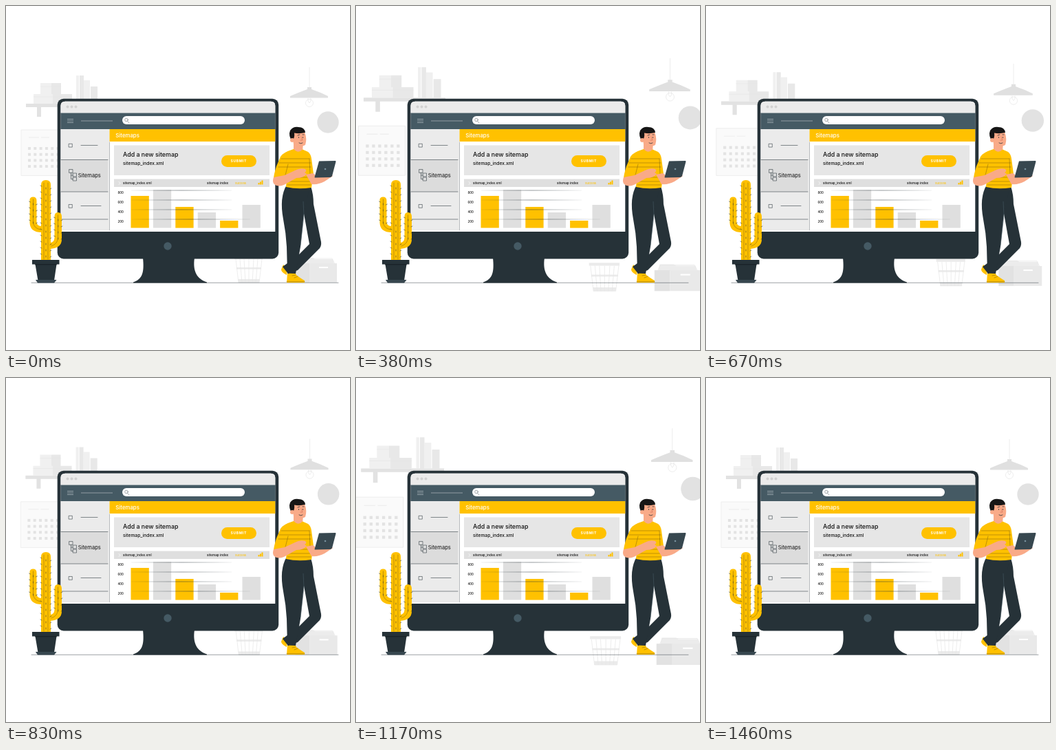
These frames come from a looping animation (500x500 px, 1500 ms). An HTML page:

```html
<!DOCTYPE html>
<html lang="en">
<head>
<meta charset="utf-8">
<title>Sitemaps</title>
<style>
  html, body { margin: 0; width: 100%; height: 100%; overflow: hidden; background: #fff; }
  svg { display: block; width: 100vw; height: 100vh; }
  text { font-family: Inter, sans-serif; font-weight: 500; fill: #111; }
  .dark { fill: #263238; }
  .yellow { fill: #ffc100; }
  .skin { fill: #f9aa88; }
  .line { fill: none; stroke: #263238; stroke-width: .55; stroke-linecap: round; }
  .soft { fill: none; stroke: #e6e6e6; stroke-width: .7; }
  .fold { fill: none; stroke: #5b4a10; stroke-width: .4; stroke-linecap: round; }
</style>
</head>
<body>
<svg viewBox="0 0 500 500">
  <g id="room">
    <!-- shelf -->
    <path fill="#e2e2e2" d="M29 142H139V147H29ZM45 147H51V161H45Z"/>
    <path fill="#f0f0f0" d="M50 112H66V128H50ZM40 128H68V142H40ZM102 101H106V142H102ZM113 108H122V142H113Z"/>
    <path fill="#e8e8e8" d="M66 112H80V128H66ZM68 128H96V142H68ZM107 101H113V142H107ZM123 117H133V142H123Z"/>
    <path class="soft" d="M50 117H80M40 132H96"/>
    <!-- calendar -->
    <path fill="#fafafa" stroke="#e8e8e8" stroke-width=".7" d="M22 180H85V246.500H22Z"/>
    <path class="soft" d="M33 191H48M51 191H63"/>
    <g id="days" fill="#e3e3e3"></g>
    <!-- lamp -->
    <path class="soft" d="M441 89V120"/>
    <path fill="#e0e0e0" d="M438 118H444V121Q456 125 468 131V133.500H413V131Q427 125 438 121Z"/>
    <circle class="soft" cx="441" cy="141" r="5.5"/>
    <path class="soft" d="M439 134V138L441 141L443 138V134"/>
    <circle cx="468" cy="169" r="15.7" fill="#e2e2e2"/>
    <!-- basket -->
    <path fill="#ebebeb" d="M332 364H373V368H332ZM335 380H371V382.500H335ZM337.500 397H368.500L368 402H338Z"/>
    <path class="soft" d="M334 368L338 402H368L372 368M340 368L343 402M346 368L348 402M353 368V402M360 368L358 402M366 368L363 402"/>
    <!-- boxes -->
    <path fill="#ececec" d="M425 375L427 366H446L449 368H475L477 375Z"/>
    <path fill="#e2e2e2" d="M420 374H441V402H420Z"/>
    <path fill="#e9e9e9" d="M441 374H481V402H441Z"/>
    <path stroke="#fff" stroke-width="2" d="M455 380H468"/>
    <path class="soft" d="M424 375L428 367H474L478 375"/>
  </g>

  <path class="line" d="M37 402.300H483" style="stroke-width:.45"/>

  <!-- monitor -->
  <path class="dark" d="M199 366C201 386 199 397 185 401.500V402.500H292V401.500C278 397 271 386 274 366Z"/>
  <rect class="dark" x="74.700" y="134.700" width="321.500" height="232.800" rx="9"/>
  <path fill="#fff" d="M79.500 145Q79.500 138.700 86 138.700H385Q391.300 138.700 391.300 145V328H79.500Z"/>
  <path fill="#ebebeb" d="M79.500 145Q79.500 138.700 86 138.700H385Q391.300 138.700 391.300 145V155.500H79.500Z"/>
  <g fill="#d2d2d2">
    <circle cx="89.500" cy="146.500" r="2"/><circle cx="95.500" cy="146.500" r="2"/><circle cx="101.500" cy="146.500" r="2"/>
  </g>
  <path fill="#455a64" d="M79.500 155.500H391.300V179H79.500Z"/>
  <path stroke="#c3ccd0" stroke-width=".6" d="M89 164.500H98M89 167H98M89 169.500H98M109 167H155"/>
  <rect x="169" y="160" width="178" height="12" rx="6" fill="#fff"/>
  <g class="line" style="stroke-width:.4"><circle cx="175" cy="165.500" r="2.300"/><path d="M176.800 167.500L179 170"/></g>

  <path fill="#ebebeb" d="M79.500 179H150.500V326H79.500Z"/>
  <path fill="#dcdcdc" d="M79.500 223.500H148V270H79.500Z"/>
  <path class="line" d="M80 223.500H148M80 270H148M80 310H148M109 202.500H133M109 290.500H138"/>
  <path class="line" d="M150.500 198V326" style="stroke-width:.3"/>
  <path class="line" d="M91.500 200.300h4.800v4.800h-4.800zM91.500 288.500h4.800v4.800h-4.800z"/>
  <path class="line" d="M92 237.500h5v5h-5zM97.500 243h5v5h-5zM97.500 249h5v5h-5zM94.500 242.500V251.500H97.500M94.500 246H97.500"/>
  <text x="104.700" y="249.300" font-size="7.600" style="font-weight:400">Sitemaps</text>

  <path class="yellow" d="M150.500 179H391.300V197H150.500Z"/>
  <text x="159.300" y="191" font-size="7.800" style="fill:#fff">Sitemaps</text>
  <path fill="#e6e6e6" d="M157 202.500H383V246H157Z"/>
  <text x="170" y="219.300" font-size="8.850">Add a new sitemap</text>
  <text x="170" y="231.300" font-size="6.700">sitemap_index.xml</text>
  <rect class="yellow" x="313" y="217" width="51" height="17" rx="8.500"/>
  <text x="326.500" y="227.400" font-size="5.200" letter-spacing=".5" style="fill:#fff;font-weight:700">SUBMIT</text>
  <path fill="#dfdfdf" d="M157 251.500H383V263H157Z"/>
  <path d="M164 255.500L166 257.500L164 259.500" fill="none" stroke="#fff" stroke-width=".8"/>
  <text x="170" y="259" font-size="4.700">sitemap_index.xml</text>
  <text x="292" y="259" font-size="4.700">sitemap index</text>
  <text x="333" y="259" font-size="3.900" style="fill:#ffc100">Success</text>
  <path class="yellow" d="M366.500 257h2v2.500h-2zM369 255.500h2v4h-2zM371.500 253.500h2v6h-2z"/>
  <g id="chart"></g>
  <circle cx="235" cy="349" r="5.700" fill="#455a64"/>

  <!-- cactus -->
  <g class="yellow">
    <path d="M51 370V260Q51 253 58 253Q65 253 65 260V370Z"/>
    <path d="M52 329Q35 329 34.500 315V283Q34 277.500 39.500 277.500Q44.500 277.500 44.500 283V314Q45 320 52 320Z"/>
    <path d="M64 353Q81 352 81 339V306Q81 300 75.500 300Q70.500 300 70.500 306V337Q70 344 64 344Z"/>
  </g>
  <path class="fold" d="M55 257V368M61 257V368M39.500 281V314Q40 323 50 325M75.500 304V337Q75 346 66 349"/>
  <path id="spines" class="line"/>
  <path class="dark" d="M38 369H77.500V375.500H73.500L70 399H46.500L42.500 375.500H38Z"/>
  <path fill="#37474f" d="M43 398H73.500L70 402.500H46Z"/>
  <path stroke="#11191c" stroke-width=".8" d="M42 375.800H74"/>

  <!-- person -->
  <path class="yellow" d="M403 376L409 380L408 391Q400 387 400 383ZM409 388L420 387L422 391Q430 397 434 399V402H408Z"/>
  <path class="fold" d="M408 400.500H434M416 392L421 391M419 395L424 393"/>
  <!-- bent leg, then the standing leg in front of it -->
  <path class="dark" d="M420 262H443Q447 274 447 288L458 343Q459 350 454 354L424 384L410 389L402 379L424 363L441 346L433 302Z"/>
  <path class="dark" d="M408 260H442Q437 285 433 302L428 350L421 389L409 388.500L408 350Q407 330 403 310Q397 278 408 260Z"/>
  <path d="M432 284L433 304L428 348" fill="none" stroke="#455a64" stroke-width=".6"/>
  <path class="skin" d="M418 198H432L431 212Q423 217 418 210Z"/>
  <path class="yellow" d="M418 208Q425 215 431 208.500L439 212Q443 215 444 222L447 244L444 264Q424 267 407 263L408 250L389 251Q389 246 393 233L399 219Q402 213 418 208Z"/>
  <path class="fold" d="M400 222H441M397 228H443M396 234H443M411 249H444M410 255H444M409 260H443M410 230L406 246M441 222L442 245"/>
  <path class="skin" d="M389 249L405 246L420 239Q427 235 435 237Q438 240 434 242L437 244Q433 250 422 250L404 260Q394 264 389 258Q387 254 389 249ZM436 245L446 243L453 248Q463 245 472 244L475 247L463 255Q454 260 444 259Z"/>
  <path d="M455 225.500L479 225Q480 225.500 479 228L474 247Q473 249 471 249L449 249.500Q448 249 449 247Z" fill="#37474f"/>
  <circle cx="464" cy="237" r="1.300" fill="#78909c"/>
  <path class="skin" d="M416 183H434Q438 193 435 202Q426 207 418 201Z"/>
  <path fill="#161616" d="M416 197Q410 188 413 181Q417 175 425 176Q434 176 435 184Q426 186 419 184.500Q420 191 416 197Z"/>
  <circle class="skin" cx="416" cy="195" r="3"/>
  <g class="line" style="stroke-width:.8">
    <path d="M424 188L427 187M431 187H433M425.500 190.500V191.500M431.500 190.500V191.500M426 199Q429 201 431 199"/>
    <path d="M429 190L431 195H428" style="stroke:#d9785d"/>
  </g>
</svg>
<script>
  const el = id => document.getElementById(id);
  const rect = (x, y, w, h, fill) => `<path d="M${x} ${y}h${w}v${h}h${-w}z"${fill ? ` fill="${fill}"` : ''}/>`;

  let days = '';
  for (let row = 0; row < 4; row++)
    for (let col = 0; col < 6; col++) days += rect(32 + col * 8.3, 205 + row * 8.7, 4, 4);
  el('days').innerHTML = days;

  const bars = [276, 267, 292, 300, 312, 289].map((top, i) =>
    rect(181.5 + i * 32.4, top, 26.3, 322.6 - top, i % 2 ? '#dfdfdf' : '#ffc100'));
  // Grid lines taper towards their ends
  const rules = [[268, 337], [282, 337], [296, 337], [310, 365]].map(([y, end]) =>
    `<path class="dark" d="M173 ${y}L${(173 + end) / 2} ${y - .3}L${end} ${y}L${(173 + end) / 2} ${y + .3}Z"/>`);
  const labels = [800, 600, 400, 200].map((n, i) =>
    `<text x="162.500" y="${272.5 + i * 14.3}" font-size="4.300">${n}</text>`);
  el('chart').innerHTML = bars.concat(rules, labels).join('');

  // Short spines along both sides of each cactus stem
  const spines = (left, right, top, bottom) => {
    let d = '';
    for (let y = top; y < bottom; y += 9)
      d += `M${left + 1} ${y}l-2 -1M${right - 1} ${y + 4}l2 -1M${(left + right) / 2} ${y + 2}v2`;
    return d;
  };
  el('spines').setAttribute('d',
    spines(51, 65, 262, 365) + spines(34.5, 44.5, 285, 318) + spines(70.5, 81, 308, 342));

  // Background zoom: [ms, scale], linear between keys
  const keys = [[0, 1], [288, 1.096], [850, 1], [1172, 1.1], [1458, 1], [1500, 1]];
  const zoomAt = t => {
    const i = keys.findIndex(k => k[0] > t);
    const [t0, a] = keys[i - 1], [t1, b] = keys[i];
    return a + (b - a) * (t - t0) / (t1 - t0);
  };

  const FPS = 24, LOOP = 1500;
  function draw() {
    const step = Math.floor((performance.now() % LOOP + 4) * FPS / 1000);
    const scale = zoomAt(step * 1000 / FPS % LOOP);
    el('room').setAttribute('transform', `translate(250 250) scale(${scale}) translate(-250 -250)`);
    requestAnimationFrame(draw);
  }
  draw();
</script>
</body>
</html>
```
